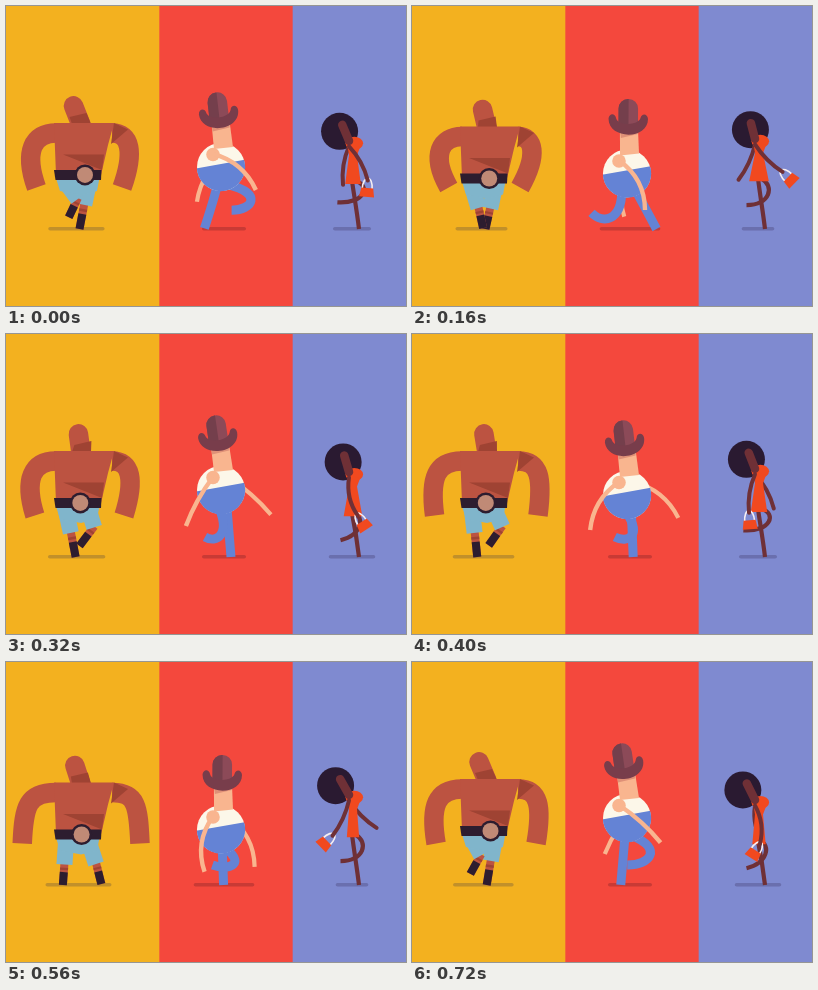
An HTML page with a canvas that plays this animation: 400x300 px, repeating every 800 ms.

```html
<!DOCTYPE html>
<html lang="en">
<head>
<meta charset="utf-8">
<title>Three walkers</title>
<style>
html, body { margin: 0; width: 100%; height: 100%; overflow: hidden; }
canvas { display: block; width: 400px; height: 300px; }
</style>
</head>
<body>
<canvas id="stage" width="400" height="300"></canvas>
<script>
const ctx = document.getElementById('stage').getContext('2d');
const LOOP = 800, BOB = LOOP / 2, STEP = 40, LAST = 720;

// Oscillation between -1 and 1 that is highest at the time `peak`.
const wave = (t, peak, period = LOOP) => Math.cos(2 * Math.PI * (t - peak) / period);
const positive = v => Math.max(0, v);
const mix = (a, b, u) => a + (b - a) * u;
const rad = deg => deg * Math.PI / 180;

function poly(color, ...p) {
  ctx.fillStyle = color;
  ctx.beginPath();
  for (let i = 0; i < p.length; i += 2) ctx.lineTo(p[i], p[i + 1]);
  ctx.fill();
}
function disc(color, x, y, rx, ry = rx) {
  ctx.fillStyle = color;
  ctx.beginPath();
  ctx.ellipse(x, y, rx, ry, 0, 0, Math.PI * 2);
  ctx.fill();
}
// Two points make a line, three a quadratic and four a cubic curve.
function limb(color, width, p, cap = 'butt') {
  ctx.strokeStyle = color;
  ctx.lineWidth = width;
  ctx.lineCap = cap;
  ctx.beginPath();
  ctx.moveTo(p[0], p[1]);
  const rest = p.slice(2);
  if (rest.length === 2) ctx.lineTo(...rest);
  else if (rest.length === 4) ctx.quadraticCurveTo(...rest);
  else ctx.bezierCurveTo(...rest);
  ctx.stroke();
}
// Arm hanging from a shoulder, swung by an angle and bowed sideways.
function pendulum(x, y, length, angle, bow) {
  const dx = Math.sin(rad(angle)), dy = Math.cos(rad(angle));
  return [x, y,
    x + dx * length / 2 + dy * bow, y + dy * length / 2 - dx * bow,
    x + dx * length, y + dy * length];
}
function shadow(color, x, half) {
  limb(color, 3.6, [x - half + 1.8, 222.8, x + half - 1.8, 222.8], 'round');
}
// Draw with the origin moved to x, y and turned by an angle in degrees.
function placed(x, y, angle, paint) {
  ctx.save();
  ctx.translate(x, y);
  ctx.rotate(rad(angle));
  paint();
  ctx.restore();
}

// ---- strongman ----
const strong = { skin: '#bc5341', shade: '#9f4333', dark: '#2d1d2f', buckle: '#c08a76', shorts: '#80b5cb' };

function strongArm(shoulder, top, out, hand, angle) {
  limb(strong.skin, 19.5, [shoulder, top + 10, out, top + 10,
    hand - Math.sin(rad(angle)) * 38, 181.5 - Math.cos(rad(angle)) * 38, hand, 181.5]);
}

function strongLeg(hip, hipY, foot, lift) {
  const { skin, shade, dark, shorts } = strong;
  const knee = (hip + foot) / 2 + 0.9 * lift, kneeY = hipY + 21 - 0.5 * lift;
  const footY = 223 - lift;
  const at = u => [mix(knee, foot, u), mix(kneeY, footY, u)];
  limb(skin, 8, [knee, kneeY, foot, footY]);
  limb(shade, 8, [...at(0.2), ...at(0.3)]);
  limb(dark, 8, [...at(0.4), foot, footY]);
  limb(shorts, 16, [hip, hipY, knee, kneeY + 1]);
}

function drawStrongman(t) {
  const { skin, shade, dark, shorts } = strong;
  const top = 118.5 + 2 * wave(t, 160, BOB), beltY = top + 52;
  const squeeze = wave(t, 150), lift = 12 * wave(t, 770);
  shadow('#c1902a', 71 - 1.5 * squeeze, 29.5 - 3.5 * squeeze);

  strongLeg(83, beltY + 8, 73.5 + 22 * positive(wave(t, 550)) ** 2, positive(-lift));
  strongLeg(60, beltY + 8, 64 + 8 * wave(t, 220), positive(lift));
  poly(shorts, 49, beltY, 94, beltY, 91, beltY + 16, 75, beltY + 20, 54, beltY + 16);

  const headX = 69.7 + 2.7 * wave(t, 320);
  limb(skin, 19.5, [headX, top - 17, 75, top + 2], 'round');
  poly(shade, headX - 4, top - 6, headX + 13, top - 10, 85, top + 1, 66, top + 1);

  const wrist = 13.5 + 16 * squeeze;
  strongArm(50, top, 25.5 + 3.7 * squeeze, 26.5 + 10.3 * squeeze, wrist);
  strongArm(106, top, 126 - 4.5 * squeeze, 121 - 13 * squeeze, -wrist);
  poly(skin, 48, top, 108, top, 102, top + 22, 95, beltY, 50, beltY);
  poly(shade, 108, top, 122, top + 6.5, 105, top + 21);
  poly(shade, 57, top + 31.5, 98, top + 31.5, 96, top + 47);

  const buckleX = 76.4 + 2.6 * wave(t, 0);
  poly(dark, 48, beltY - 5, 95.5, beltY - 5, 95, beltY + 5, 49.5, beltY + 5);
  disc(dark, buckleX, beltY, 10.5);
  disc(strong.buckle, buckleX, beltY, 8);
}

// ---- cowboy ----
const cowboy = { skin: '#f9b58f', shade: '#df9077', blue: '#6483d5', white: '#fcf7e9' };

// A step runs from u = -1 to 1; the swinging foot moves right (dir 1), the planted one left.
function cowboyLeg(u, dir, bodyY) {
  const late = positive(u) ** 8, early = positive(-u) ** 8;
  const swinging = dir > 0;
  const lift = swinging ? 20 * (1 - u ** 8) + 11 * early : 11 * late;
  const bend = swinging ? 1 - late : late;
  const lean = swinging ? u : -1;
  const hip = 217 + dir * 8 * u, hipY = bodyY + 18;
  const foot = 212 + dir * (8 * u + 33 * u ** 3 - 6.5 * (1 - u * u)), footY = 223 - lift;
  limb(cowboy.blue, 9, [hip, hipY,
    mix(hip, foot, 1 / 3) + bend * (24 + 16 * lean), mix(hipY, footY, 1 / 3) + bend * (10 - 14 * lean),
    mix(hip, foot, 2 / 3) + bend * (14 + 14 * lean), mix(hipY, footY, 2 / 3) + bend * (13 - 6 * lean),
    foot, footY]);
}

function paintHat() {
  ctx.fillStyle = '#8c4a58';
  ctx.beginPath();
  ctx.roundRect(-9.5, 0, 19.5, 28, [9.5, 9.5, 0, 0]);
  ctx.fill();
  ctx.fillStyle = '#743f4c';
  ctx.beginPath();
  ctx.roundRect(-9.5, 0, 10, 28, [9.5, 0, 0, 0]);
  ctx.fill();
  ctx.fillStyle = '#783d4b';
  ctx.beginPath();
  ctx.moveTo(-19.5, 20);
  ctx.bezierCurveTo(-19, 14, -13, 14, -12, 19);
  ctx.bezierCurveTo(-10, 27, 10, 27, 12.5, 19);
  ctx.bezierCurveTo(13.5, 14, 19.5, 14, 20, 20);
  ctx.bezierCurveTo(20, 41, -19, 41, -19.5, 20);
  ctx.fill();
}

function drawCowboy(t) {
  const { skin, shade, blue, white } = cowboy;
  const y = 162.5 + 6.5 * wave(t, 115, BOB);
  const u = (t - 120 + LOOP) % LOOP / BOB - 1;
  const swing = (9 * wave(t, 0) - wave(t, 0, LOOP / 3)) / 8;
  const bow = 17 * wave(t, 89);
  shadow('#c93a35', 218, 22 + 24 * positive(wave(t, 120, BOB)) ** 5);

  limb(skin, 4.2, pendulum(222, y - 13, 57, 9 - 42 * swing, -bow));
  cowboyLeg(u, -1, y);
  cowboyLeg(u, 1, y);

  disc(white, 215, y, 24);
  ctx.save();
  ctx.beginPath();
  ctx.arc(215, y, 24.2, 0, Math.PI * 2);
  ctx.clip();
  placed(215, y - 3, -10, () => {
    ctx.fillStyle = blue;
    ctx.fillRect(-30, 0, 60, 50);
  });
  ctx.restore();

  const nod = wave(t, 140, BOB);
  const hatX = 212.3 + 4 * nod, hatY = y - 74.5, tilt = -4 + 4.5 * nod;
  const brimX = hatX - Math.sin(rad(tilt)) * 31, brimY = hatY + 31;
  poly(skin, brimX - 8, brimY, brimX + 10, brimY - 2, 227, y - 20, 208, y - 18);
  poly(shade, brimX - 8, brimY, brimX + 10, brimY - 1, brimX + 10, brimY + 4, brimX - 7, brimY + 8);
  placed(hatX, hatY, tilt, paintHat);

  disc(skin, 207, y - 12.5, 6.8);
  limb(skin, 4.4, pendulum(207, y - 13, 56, 9.5 + 40.5 * swing, bow));
}

// ---- woman ----
const woman = { skin: '#6f3036', hair: '#2a1a31', red: '#f1491f', white: '#f6eef2' };

// Planted for 320 ms, then the foot is raised behind for the rest of the loop.
function womanLeg(t, hipY) {
  const u = positive(((t + 200) % LOOP - 0) / 480);
  const raised = u < 1 ? Math.sin(Math.PI * u ** 1.2) : 0;
  const back = u < 1 ? Math.sqrt(Math.sin(Math.PI * u)) : 0;
  limb(woman.skin, 4.2, [346 + 4 * raised, hipY,
    348 + 19 * raised, 189 - 11 * raised, 351 + 9 * raised, 206 - 9 * raised,
    353 - 22 * back, 223 - 30 * raised]);
}

function paintBag() {
  limb(woman.white, 1.6, [-5, 9, -5, -6, 5, -6, 5, 9]);
  poly(woman.red, -6, 7.5, 6, 7.5, 7.5, 16.5, -7.5, 16.5);
}

function drawWoman(t) {
  const { skin, hair, red } = woman;
  const bob = wave(t, 300, BOB), sway = wave(t, 211), swing = 36 * wave(t, 130);
  const bow = 8 * wave(t, -111);
  const bustY = 137.3 + 3.3 * bob, hemY = 178 + 4.5 * bob;
  const hairX = 334 + 4.8 * sway, hairY = 125.3 + 2.8 * bob;
  shadow('#6a6fae', 346, 19 + 4.5 * bob);

  disc(hair, hairX, hairY, 18.5);
  womanLeg(t + LOOP / 2, hemY - 3);
  womanLeg(t, hemY - 3);
  limb(skin, 4, pendulum(343, bustY + 3, 39, 10 - swing, -bow), 'round');

  const half = 8 + 2 * sway;
  disc(red, 348.3, bustY, 8.8, 6.5);
  poly(red, 341, bustY - 1, 354, bustY + 4, 351, bustY + 12, 347 + half, hemY, 347 - half, hemY, 343, bustY + 12);
  limb(skin, 8.5, [336.5 + 2.6 * sway, hairY - 6.5, 343, bustY - 2.5], 'round');

  const arm = pendulum(343, bustY + 3, 39, 10 + swing, bow);
  placed(arm[4], arm[5], -50 * sway, paintBag);
  limb(skin, 4, arm, 'round');
}

function panel(color, left) {
  ctx.fillStyle = color;
  ctx.fillRect(left, 0, 400 - left, 300);
}

function draw(t) {
  panel('#f3b11f', 0);
  panel('#f4483d', 153.33);
  panel('#7f8ad0', 286.67);
  drawStrongman(t);
  drawCowboy(t);
  drawWoman(t);
}

const start = performance.now();
function tick() {
  const elapsed = (performance.now() - start) % LOOP;
  draw(Math.min(Math.floor(elapsed / STEP) * STEP, LAST));
  requestAnimationFrame(tick);
}
tick();
</script>
</body>
</html>
```
